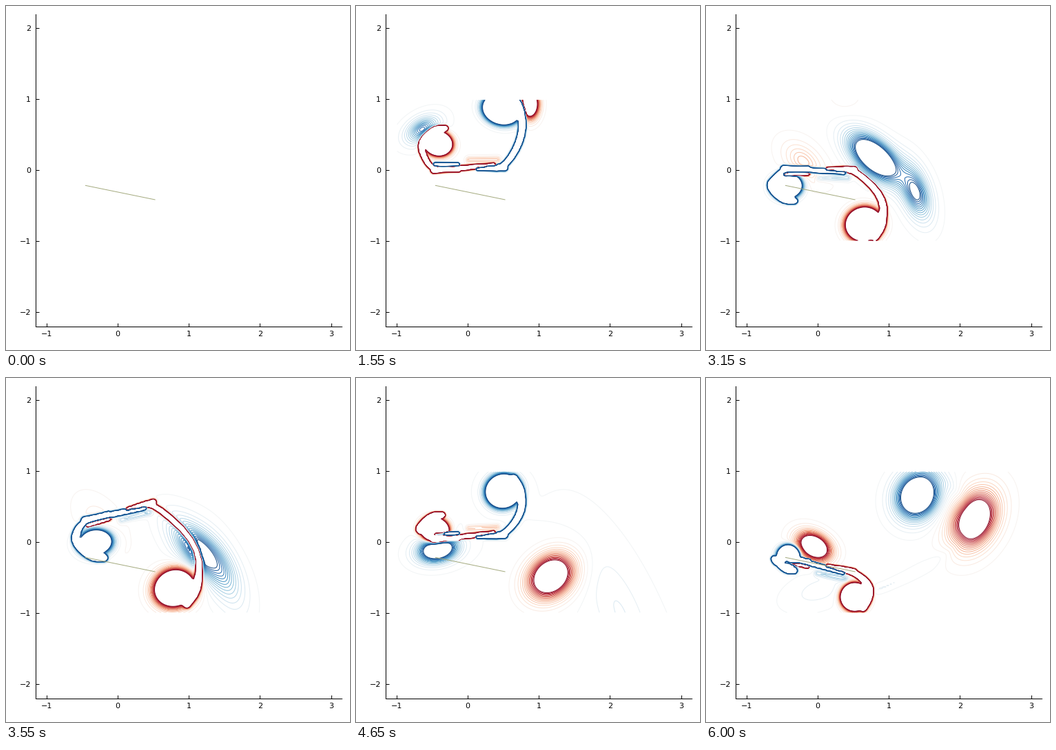
Animation, 499 px wide and 499 px high, one loop 6.05 s. Source, as a matplotlib script:

```python
import numpy as np
import matplotlib.pyplot as plt
from matplotlib.animation import FuncAnimation

SIZE, DPI = 499, 100
FRAMES, STEP = 121, 50
PX = 72 / DPI
HALF = np.pi / 2                      # duration of one stroke, seconds
LEVELS = np.linspace(1, 29, 15) / 29
FLOOR = np.log(29)                    # minus log of the lowest level
OFF = -FLOOR
REDS = plt.get_cmap("RdBu_r")(.5 + .45 * LEVELS)
BLUES = plt.get_cmap("RdBu_r")(.5 - .45 * LEVELS)

gx, gy = np.meshgrid(np.linspace(-0.99, 2.99, 200), np.linspace(-0.99, 0.99, 100))


def bump(q, peak):
    """Bell that falls to the lowest level at q = 1."""
    if peak <= OFF + .05:
        return 0
    return np.exp(np.minimum(peak - (peak + FLOOR) * q ** .8, 1.6))


class Vortex:
    """Moves through key points (t, x, y), growing, turning and fading with age."""

    def __init__(self, path, size=.7, grow=1.2, tilt=0, stretch=0, life=9, hot=4):
        self.ts, self.xy = np.split(np.array(path, float), [1], axis=1)
        self.ts = self.ts[:, 0]
        self.slope = np.gradient(self.xy, self.ts, axis=0)
        self.size, self.grow, self.tilt = size, grow, tilt
        self.stretch, self.life, self.hot = stretch, life, hot

    def place(self, t):
        ts, xy, slope = self.ts, self.xy, self.slope
        if t >= ts[-1]:
            return xy[-1] + slope[-1] * (t - ts[-1])
        i = np.searchsorted(ts, t, side="right") - 1
        h = ts[i + 1] - ts[i]
        u = (t - ts[i]) / h
        return ((xy[i] * (1 + 2 * u) + slope[i] * h * u) * (1 - u) ** 2
                + (xy[i + 1] * (3 - 2 * u) - slope[i + 1] * h * (1 - u)) * u * u)

    def at(self, t):
        """Field, centre and core radii at time t."""
        age = t - self.ts[0]
        if age <= 0:
            return None
        x, y = self.place(t)
        r = .02 + self.size * (1 - np.exp(-age / self.grow))
        a, b = r * np.exp(np.array([.5, -.5]) * self.stretch * age)
        peak = .8 + self.hot * np.exp(-age ** 2 / 1.6) - 2 * max(0, age - self.life)
        turn = np.radians(self.tilt * age)
        c, s = np.cos(turn), np.sin(turn)
        dx, dy = gx - x, gy - y
        field = bump(((dx * c + dy * s) / a) ** 2 + ((dy * c - dx * s) / b) ** 2, peak)
        core = (max(peak, 0) / (max(peak, 0) + FLOOR)) ** .625
        return field, x, y, a * core, b * core


def lead(path, **kw):
    return Vortex(path, size=.42, grow=.8, **kw)


# One (trailing, leading) pair per stroke, upstroke first
STROKES = [
    (Vortex([(0, .52, 0), (.65, .66, .3), (1.55, .87, .93), (2.35, .62, 1.04)],
            size=.38, stretch=-.3, life=1.4),
     lead([(0, -.5, 0), (1, -.5, .4), (1.55, -.63, .57), (2.35, .2, .08)],
          tilt=20, stretch=.3, life=.7)),
    (Vortex([(.7, .5, .74), (1.55, .48, .86), (2.35, .43, .48), (3.15, .8, .18),
             (3.95, 1.52, -.45)], tilt=-17, stretch=.28, life=2.6),
     lead([(.7, -.46, .4), (1.55, -.42, .38), (2.35, -.15, -.15), (3.15, -.2, .12)],
          tilt=-18, stretch=.2, life=1.6)),
    (Vortex([(2.25, .55, -.8), (3.15, .65, -.76), (3.95, .97, -.53), (4.65, 1.17, -.48),
             (6, 2.2, .32)], tilt=17, stretch=.1),
     lead([(2.25, -.47, -.4), (3.15, -.43, -.22), (3.95, -.22, .16), (4.65, -.42, -.1),
           (5.6, -.1, -.5)], tilt=5, stretch=.2, life=2.4)),
    (Vortex([(3.8, .45, .8), (4.65, .5, .72), (6, 1.4, .66)], tilt=28, stretch=.07),
     lead([(3.8, -.52, .25), (4.65, -.46, .17), (6, -.05, -.06)], tilt=-14, stretch=.17)),
    (Vortex([(5.4, .55, -.8), (6, .52, -.77)]),
     lead([(5.4, -.45, -.4), (6, -.41, -.2)])),
]
SPLIT = Vortex([(1.7, .65, .3), (2.35, .88, -.13), (3.15, 1.38, -.32), (3.95, 1.55, -.62)],
               tilt=12, stretch=-.5, life=.9, hot=1.5)


def smooth(pts):
    """Corner cutting that keeps both ends."""
    for _ in range(2):
        cut = np.stack([.75 * pts[:-1] + .25 * pts[1:],
                        .25 * pts[:-1] + .75 * pts[1:]], 1).reshape(-1, 3)
        pts = np.vstack([pts[:1], cut[1:-1], pts[-1:]])
    return pts


def ribbon(pts, peak):
    """Layer along a smooth line of (x, y, half-width) points."""
    if peak <= OFF + .05:
        return 0
    pts = smooth(np.array(pts, float))
    q = np.full(gx.shape, 99.)
    for (x0, y0, w0), (x1, y1, w1) in zip(pts[:-1], pts[1:]):
        ex, ey = x1 - x0, y1 - y0
        u = np.clip(((gx - x0) * ex + (gy - y0) * ey) / (ex * ex + ey * ey + 1e-9), 0, 1)
        d2 = (gx - x0 - u * ex) ** 2 + (gy - y0 - u * ey) ** 2
        np.minimum(q, d2 / (w0 + u * (w1 - w0)) ** 2, out=q)
    return bump(q, peak)


def plate(t, u, v=0):
    """Point at chord position u and normal offset v on the flapping plate."""
    wave = np.sin(2 * t)
    c, s = np.cos(.378 * wave), np.sin(.378 * wave)
    return .02 + u * c - v * s, .588 * wave + u * s + v * c


def strip(t, u0, u1, v0, v1, w0, w1, peak):
    return ribbon([(*plate(t, u0 + k * (u1 - u0), v0 + k * (v1 - v0)), w0 + k * (w1 - w0))
                   for k in (0, .5, 1)], peak)


def stroke(n, t):
    s = 1 if n % 2 else -1
    begin = max((n - .5) * HALF - .1, -.1)
    end = (n + .5) * HALF - .1
    trail, head = (v.at(t) for v in STROKES[n])
    out = np.zeros(gx.shape)
    aged = np.interp(t, [end - .4, end + .15], [0, 1])

    if trail:
        # Sheet from the tail around the outside of its vortex
        field, x, y, a, b = trail
        drift = max(0, t - end)
        tx, ty = plate(min(t, end), .5)
        ix, iy = plate(min(t, end), .25)
        w = .075 + .05 * aged
        side = x + 1.05 * a + .18 * aged + .4 * drift
        peak = np.interp(t, [begin, begin + .2, end - .4, end + .1, end + .4, end + .8],
                         [OFF, 3.5, 3.5, -.9, -1.2, OFF])
        out -= s * field
        out -= s * ribbon([(ix + .4 * drift, iy, .045), (tx + .4 * drift, ty, .065),
                           (side, (ty + y) / 2, w), (side, y, w),
                           (x + .6 * a, y + s * (.75 * b + .15 * aged), w)], peak)
    if head:
        # Sheet from the nose around its vortex
        field, x, y, a, b = head
        nx, ny = plate(t, -.5)
        w = .06 + .09 * aged
        peak = np.interp(t, [begin, begin + .25, end - .35, end + .1, end + .6],
                         [OFF, 3.5, 3.5, .2, OFF])
        out += s * field
        out += s * ribbon([(*plate(t, -.15, -.02 * s), .04), (nx, ny, .055),
                           (nx - .1, ny + .1 * s, w), (x - a - w, y, w),
                           (x - .3 * a, y + s * (b + .6 * w), w),
                           (x + .5 * a, y + s * (b + .6 * w), w)], peak)

    # Boundary layers on the plate
    def level(top):
        return np.interp(t, [begin, begin + .15, end - .2, end + .1, end + .45],
                         [OFF, top, top, .2, OFF])

    if begin < t < end + .45:
        w = .06 + .05 * aged
        out += s * strip(t, -.5, .35, -.02 * s, .04 * s, w, .7 * w, level(3))
        out -= s * strip(t, -.47, -.15, .06 * s, .06 * s, .05, .03, level(2.5))
        out -= s * strip(t, .12, .5, 0, 0, .04, .065, level(3))
        out += s * strip(t, 0, .4, .12 * s, .12 * s, .07, .07, level(-1))
    return out


def vorticity(t):
    field = sum(stroke(n, t) for n in range(len(STROKES)))
    blob = SPLIT.at(t)
    return field - blob[0] if blob else field


plt.rcParams["font.family"] = "DejaVu Sans"
fig = plt.figure(figsize=(SIZE / DPI, SIZE / DPI), dpi=DPI, facecolor="white")
ax = fig.add_axes([43.2 / SIZE, 34.2 / SIZE, 444 / SIZE, 453.2 / SIZE])
ax.set(xlim=(-1.15, 3.15), ylim=(-2.2, 2.2), xticks=range(-1, 4), yticks=range(-2, 3))
ax.spines[["top", "right"]].set_visible(False)
ax.spines[["left", "bottom"]].set_linewidth(PX)
ax.tick_params(direction="in", length=5 * PX, width=PX, labelsize=8)
ax.tick_params(axis="x", pad=6 * PX)
ax.tick_params(axis="y", pad=7 * PX)
ax.plot([-.451, .524], [-.215, -.415], color="#a5ab80", lw=PX, zorder=3)

rings = []


def draw(i):
    while rings:
        rings.pop().remove()
    if i:
        w = vorticity(i * STEP / 1000)
        for field, colors in ((w, REDS), (-w, BLUES)):
            if field.max() > LEVELS[0]:
                rings.append(ax.contour(gx, gy, field, LEVELS, colors=colors,
                                        linewidths=PX, zorder=2))
    return []


anim = FuncAnimation(fig, draw, frames=FRAMES, interval=STEP, repeat=True,
                     init_func=lambda: draw(0))
plt.show()
```
